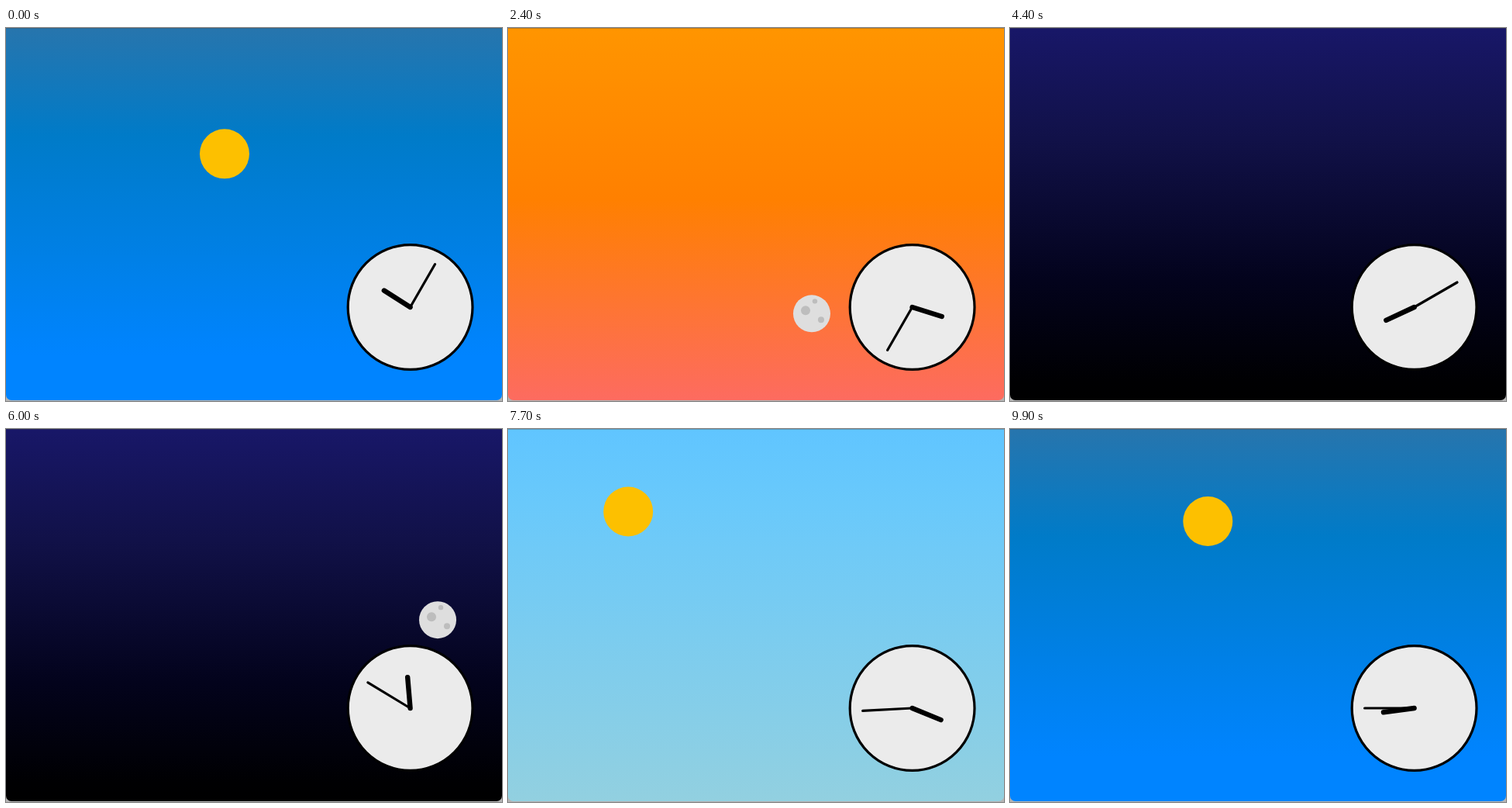
An HTML page with a canvas that plays this animation: 640 px wide and 481 px high, repeating every 10000 ms.

```html
<!DOCTYPE html>
<html lang="en">
<head>
<meta charset="utf-8">
<title>Day and night</title>
<style>
  html, body { margin: 0; width: 100%; height: 100%; overflow: hidden; background: #b4b4b4; }
  canvas { display: block; }
</style>
</head>
<body>
<canvas id="stage" width="640" height="481"></canvas>
<script>
const ctx = document.getElementById('stage').getContext('2d');
const LOOP = 10000, STEP = 100, DAY = 1440, TAU = Math.PI * 2;

// Clock minutes reached at given milliseconds; the pace wavers slightly.
const pace = [[0, 605], [900, 728.8], [2400, 935], [4400, 1210], [6000, 1430.2], [7700, 1664.5], [9900, 1965]];

// One sky for each quarter of the day, starting at midnight.
const skies = [
  [[0, '#60c5ff'], [0.2, '#69c9fb'], [1, '#92d0e0']],
  [[0, '#2775ad'], [0.29, '#007bc8'], [0.88, '#0084ff'], [1, '#0084ff']],
  [[0, '#ff9500'], [0.46, '#ff8000'], [1, '#fd6b60']],
  [[0, '#181768'], [0.3, '#111148'], [0.68, '#03031c'], [0.95, '#000002'], [1, '#000']]
].map(stops => {
  const sky = ctx.createLinearGradient(0, 0, 0, 480);
  stops.forEach(([at, color]) => sky.addColorStop(at, color));
  return sky;
});

function minutesAt(ms) {
  const i = pace.findIndex(([end]) => end > ms);
  const [[t0, m0], [t1, m1]] = pace.slice((i < 0 ? pace.length : i) - 1 - (i < 0)).slice(0, 2);
  return m0 + (m1 - m0) * (ms - t0) / (t1 - t0);
}

function disc(x, y, r, color) {
  ctx.fillStyle = color;
  ctx.beginPath();
  ctx.arc(x, y, r, 0, TAU);
  ctx.fill();
}

function moon(x, y) {
  disc(x, y, 24, '#dedede');
  disc(x - 8, y - 4, 6, '#bdbdbd');
  disc(x + 4, y - 16, 3.2, '#bdbdbd');
  disc(x + 12, y + 8, 4, '#bdbdbd');
}

function hand(turn, length, width) {
  const a = turn * TAU;
  ctx.lineWidth = width;
  ctx.beginPath();
  ctx.moveTo(521.6, 360);
  ctx.lineTo(521.6 + Math.sin(a) * length, 360 - Math.cos(a) * length);
  ctx.stroke();
}

function clock(minutes) {
  disc(521.6, 360, 80.4, '#ebebeb');
  ctx.strokeStyle = '#000';
  ctx.lineCap = 'round';
  ctx.lineWidth = 3.2;
  ctx.stroke();
  hand(minutes / 60, 64, 3.2);
  hand(minutes / 720, 40, 6.4);
}

function draw(ms) {
  const minutes = minutesAt(ms), time = minutes % DAY;
  const x = 80.3 + time / 3;
  const y = 239.3 - 160 * Math.sin(time / DAY * TAU);

  ctx.clearRect(0, 0, 640, 481);
  ctx.fillStyle = skies[Math.floor(time / 360)];
  ctx.beginPath();
  ctx.roundRect(0, 0, 640, 480, [0, 0, 7, 7]);
  ctx.fill();
  ctx.fillStyle = 'rgba(70, 70, 70, 0.35)';
  ctx.fillRect(0, 0, 640, 1);

  if (time < DAY / 2) disc(x, y, 32, '#fdc000');
  else moon(x, y);
  clock(minutes);
}

function tick() {
  draw(Math.floor(performance.now() % LOOP / STEP) * STEP);
  requestAnimationFrame(tick);
}
tick();
</script>
</body>
</html>
```
